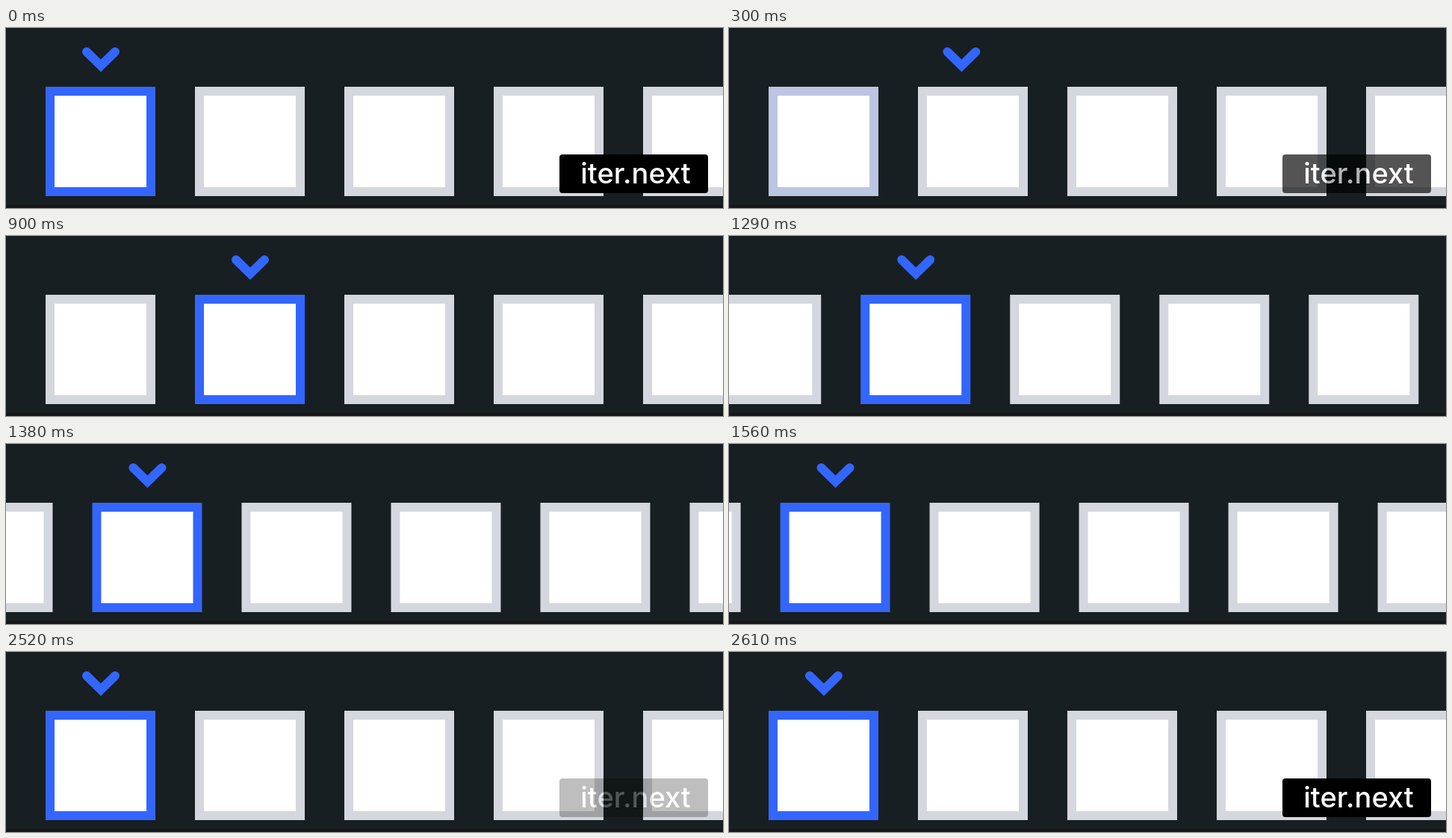
Recreate the animation shown at these times as an HTML page with a canvas. Size 960 by 242 pixels, loop 2.73 s.

```html
<!DOCTYPE html>
<html lang="en">
<head>
<meta charset="utf-8">
<title>Iterator</title>
<style>
  html, body { margin: 0; width: 100%; height: 100%; overflow: hidden; background: #181f22; }
  canvas { display: block; }
</style>
</head>
<body>
<canvas id="stage" width="960" height="242"></canvas>
<script>
const ctx = document.getElementById('stage').getContext('2d');
const LOOP = 2730, STEP = 30, MOVE = 540, SLIDE_AT = 1260;
const PITCH = 200, SIZE = 147, BORDER = 12;
const BLUE = [51, 102, 255], GREY = [212, 215, 221];

const clamp = v => Math.min(1, Math.max(0, v));
const ramp = (t, from, to) => clamp((t - from) / (to - from));
const mix = (a, b, k) => `rgb(${a.map((v, i) => Math.round(v + (b[i] - v) * k)).join(',')})`;

function bezier(x1, y1, x2, y2) {
  const at = (a, b, s) => 3 * a * s * (1 - s) ** 2 + 3 * b * s * s * (1 - s) + s ** 3;
  return u => {
    if (u <= 0 || u >= 1) return clamp(u);
    let lo = 0, hi = 1;
    for (let i = 0; i < 30; i++) {
      const mid = (lo + hi) / 2;
      if (at(x1, x2, mid) < u) lo = mid; else hi = mid;
    }
    return at(y1, y2, lo);
  };
}
const glide = bezier(0, 0.65, 0.4, 1);
const ease = bezier(0.25, 0.1, 0.25, 1);

function drawBox(x, color) {
  ctx.fillStyle = color;
  ctx.fillRect(x, 79, SIZE, SIZE);
  ctx.fillStyle = '#fff';
  ctx.fillRect(x + BORDER, 79 + BORDER, SIZE - 2 * BORDER, SIZE - 2 * BORDER);
}

function drawArrow(x) {
  ctx.strokeStyle = mix(BLUE, BLUE, 0);
  ctx.lineWidth = 12;
  ctx.lineCap = 'round';
  ctx.lineJoin = 'miter';
  ctx.beginPath();
  ctx.moveTo(x - 19, 32);
  ctx.lineTo(x, 50.7);
  ctx.lineTo(x + 19, 32);
  ctx.stroke();
}

function drawLabel(alpha) {
  if (alpha <= 0) return;
  // Black under white at one group opacity: text colour is blended from the backdrop.
  layer.clearRect(0, 0, 199, 52);
  layer.fillStyle = '#000';
  layer.beginPath();
  layer.roundRect(0, 0, 199, 52, 4);
  layer.fill();
  layer.fillStyle = '#fff';
  layer.font = '500 38px Inter, sans-serif';
  layer.textAlign = 'center';
  layer.fillText('iter.next', 102, 39);
  ctx.globalAlpha = alpha;
  ctx.drawImage(layer.canvas, 741, 170);
  ctx.globalAlpha = 1;
}
const layer = Object.assign(document.createElement('canvas'), { width: 199, height: 52 }).getContext('2d');

function draw(t) {
  ctx.fillStyle = '#181f22';
  ctx.fillRect(0, 0, 960, 242);
  ctx.fillStyle = '#171719';
  ctx.fillRect(0, 238, 960, 4);

  const shift = PITCH * glide(ramp(t, SLIDE_AT, SLIDE_AT + MOVE));
  const hop = PITCH * glide(ramp(t, 0, MOVE));
  const leave = ease(ramp(t, 0, MOVE));
  const enter = ramp(t, 300, MOVE);
  for (let i = 0; i < 6; i++) {
    const lit = i === 0 ? 1 - leave : i === 1 ? enter : 0;
    drawBox(53 + i * PITCH - shift, mix(GREY, BLUE, lit));
  }
  drawArrow(127 + hop - shift);
  drawLabel(t < 1200 ? 1 - ramp(t, 0, 900) : ramp(t, 2490, 2610));
}

const start = performance.now();
function tick() {
  const t = (performance.now() - start) % LOOP;
  draw(Math.floor(t / STEP) * STEP);
  requestAnimationFrame(tick);
}
tick();
</script>
</body>
</html>
```
